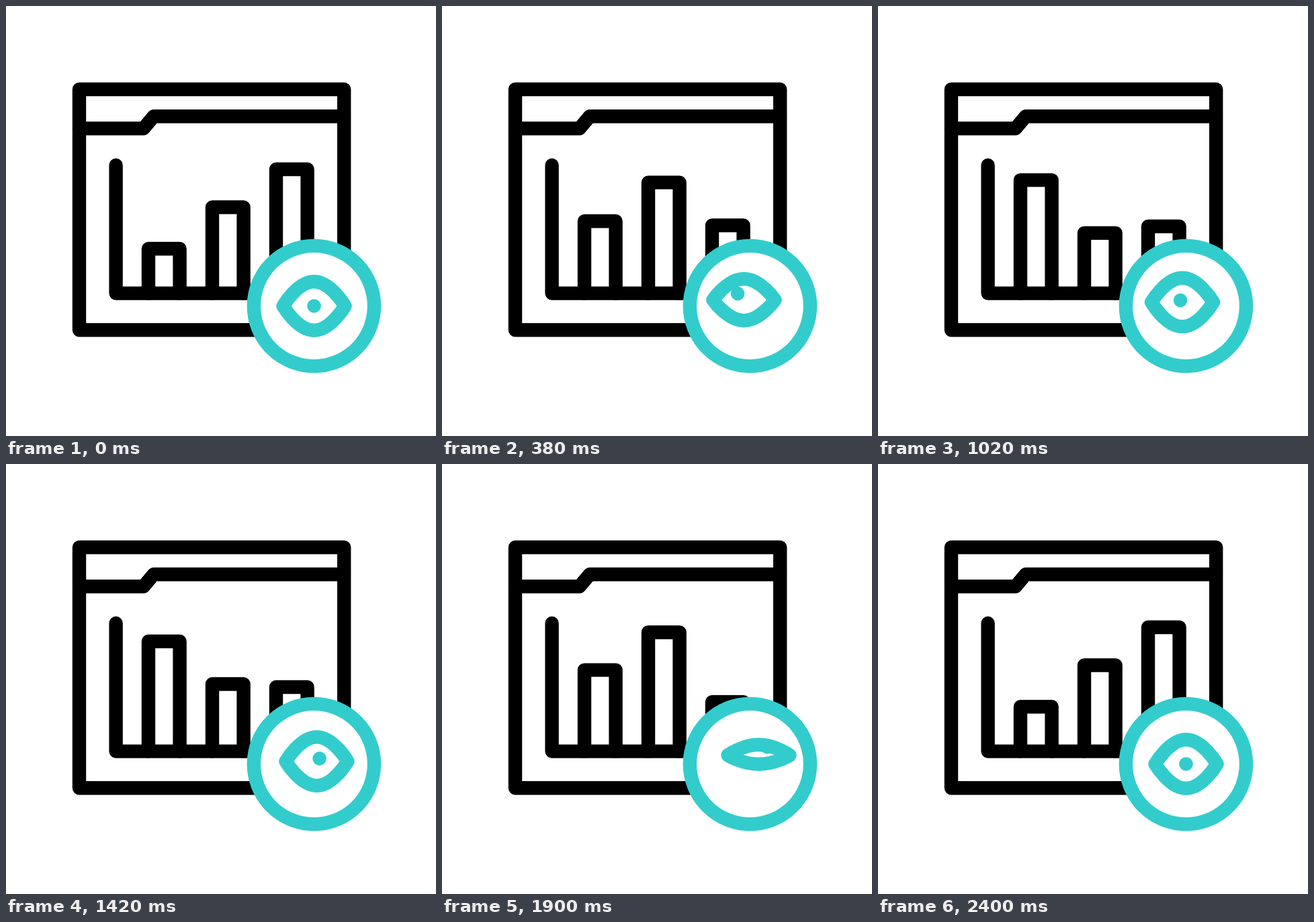
An HTML page that plays this animation: 640x640 px, repeating every 2.42 s.

```html
<!DOCTYPE html>
<html lang="en">
<head>
<meta charset="utf-8">
<title>Chart monitor</title>
<style>
  html, body { margin: 0; width: 100%; height: 100%; overflow: hidden; background: #fff; }
  svg { display: block; width: 100%; height: 100%; }
  g { fill: none; stroke: #000; stroke-width: 20.4; stroke-linecap: round; stroke-linejoin: round; }
  .badge { stroke: #3cc; }
</style>
</head>
<body>
<svg viewBox="0 0 640 640">
  <g>
    <path d="M109 124H503.2V482.3H109Z"/>
    <path d="M109 182.2H204.8L220 164.2H503"/>
    <path d="M163.6 237V427.6H458"/>
    <path class="bar"/>
    <path class="bar"/>
    <path class="bar"/>
  </g>
  <g class="badge">
    <circle cx="458.4" cy="446.5" r="89.6" fill="#fff"/>
    <path id="eye"/>
    <circle id="pupil" r="10.3" fill="#3cc" stroke="none"/>
  </g>
</svg>
<script>
const LOOP = 2420, STEP = 20, CYCLE = 2400, HALF = 1200;
const EYE = { x: 458.5, y: 446.5, w: 46 };

// Each track is a list of [time, value], eased between neighbours.
const bars = [
  { x: 212, track: [[0, 361.3], [600, 302.2], [1200, 247.2]] },
  { x: 307, track: [[0, 299.5], [600, 246.5], [1200, 363]] },
  { x: 402, track: [[0, 243], [600, 363], [1200, 318.4]] }
];
const glance = [[0, 0], [600, 13], [800, 13], [1200, 0]];
const look = [[0, 0], [600, 13.5], [1200, 0]];
const blink = [[0, 0], [300, 0], [600, 1], [900, 0], [1200, 0]];

const ease = u => u * u * (3 - 2 * u);
const mix = (a, b, u) => a + (b - a) * u;

function at(track, t) {
  const i = Math.max(1, track.findIndex(k => k[0] >= t));
  const [t0, a] = track[i - 1], [t1, b] = track[i];
  return mix(a, b, ease((t - t0) / (t1 - t0)));
}

const barEls = document.querySelectorAll('.bar');
const eye = document.getElementById('eye');
const pupil = document.getElementById('pupil');

function draw(ms) {
  const t = Math.floor((ms % LOOP) / STEP) * STEP % CYCLE;

  // Bars go out and back along the same path.
  const swing = t <= HALF ? t : CYCLE - t;
  bars.forEach(({ x, track }, i) => {
    barEls[i].setAttribute('d', `M${x} 427.6V${at(track, swing)}h46.6V427.6`);
  });

  // The eye glances left, then right, blinking each time.
  const side = t < HALF ? -1 : 1;
  const s = t % HALF;
  const shift = at(glance, s), roll = shift + at(look, s), shut = at(blink, s);
  const x = EYE.x + side * shift, y = EYE.y - shift, w = EYE.w;
  const up = y - mix(36.2, 8.6, shut), down = y + mix(36.2, 5.2, shut);
  const l = x - w, r = x + w;
  eye.setAttribute('d',
    `M${l} ${y}C${l} ${y} ${x - 25} ${up} ${x} ${up}S${r} ${y} ${r} ${y}` +
    `S${x + 25} ${down} ${x} ${down}S${l} ${y} ${l} ${y}Z`);
  pupil.setAttribute('cx', EYE.x + side * roll);
  pupil.setAttribute('cy', EYE.y - roll);
}

const start = performance.now();
function tick() {
  draw(performance.now() - start);
  requestAnimationFrame(tick);
}
tick();
</script>
</body>
</html>
```
